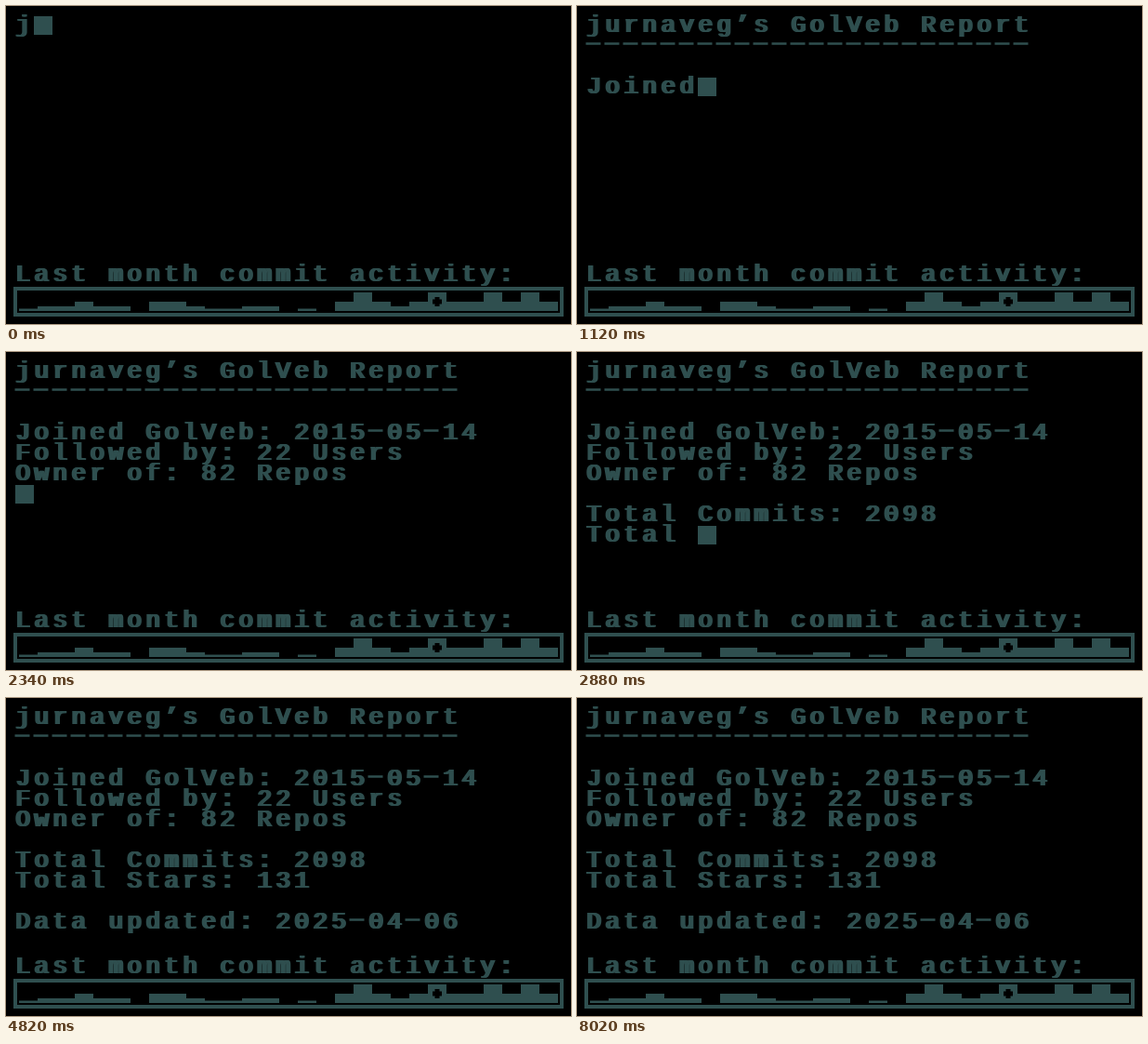
These frames come from a looping animation (608 px wide and 342 px high, 8420 ms). An HTML page with a canvas:

```html
<!DOCTYPE html>
<html lang="en">
<head>
<meta charset="utf-8">
<title>Terminal activity</title>
<style>
  html, body { margin: 0; width: 100%; height: 100%; overflow: hidden; background: #000; }
  canvas { display: block; width: 608px; height: 342px; }
</style>
</head>
<body>
<canvas id="stage" width="608" height="342"></canvas>
<script>
const ctx = document.getElementById('stage').getContext('2d');

const LOOP = 8420, STEP = 20, BLINK_START = 3620, BLINK = 400;
const CELL = 20, LINE = 22, LEFT = 10, TOP = 10;
const DOT = CELL / 8;
const INK = '#2f4f4f';

const script = [
  'jurnaveg’s GolVeb Report',
  '-'.repeat(24),
  '',
  'Joined GolVeb: 2015-05-14',
  'Followed by: 22 Users',
  'Owner of: 82 Repos',
  '',
  'Total Commits: 2098',
  'Total Stars: 131',
  '',
  'Data updated: 2025-04-06'
].join('\n');

// One digit per day, in eighths of a cell
const days = '12242204421122010484248448484';
const markedDay = 22;

function drawChar(ch, x, y) {
  if (ch === '-') {
    ctx.fillRect(x - 0.5, y + 7.25, 16, DOT);
    return;
  }
  // Repeated offsets give heavy stems and thin bars
  for (const dx of [-1, 0, 1, 2]) ctx.fillText(ch, x + dx, y + 18);
}

function drawLine(text, y) {
  [...text].forEach((ch, i) => drawChar(ch, LEFT + i * CELL, y));
}

function drawChart() {
  const x0 = 14, y0 = 308;
  ctx.lineWidth = 4;
  ctx.strokeRect(10, 304, 588, 28);
  [...days].forEach((level, i) => {
    const h = level * DOT;
    ctx.fillRect(x0 + i * CELL, y0 + CELL - h, CELL, h);
  });

  const x = x0 + markedDay * CELL;
  ctx.fillStyle = '#000';
  ctx.fillRect(x + 3 * DOT, y0 + 2 * DOT, 2 * DOT, 4 * DOT);
  ctx.fillRect(x + 2 * DOT, y0 + 3 * DOT, 4 * DOT, 2 * DOT);
  ctx.fillStyle = INK;
}

function cursorVisible(t) {
  return t < BLINK_START || Math.floor((t - BLINK_START) / BLINK) % 2 === 0;
}

function draw(t) {
  ctx.fillStyle = '#000';
  ctx.fillRect(0, 0, 608, 342);
  ctx.fillStyle = ctx.strokeStyle = INK;
  ctx.font = '26px "Liberation Mono", "DejaVu Sans Mono", monospace';
  ctx.textBaseline = 'alphabetic';

  const typed = script.slice(0, Math.floor(t / STEP) + 1).split('\n');
  typed.forEach((text, row) => drawLine(text, TOP + row * LINE));

  if (cursorVisible(t)) {
    const row = typed.length - 1;
    ctx.fillRect(LEFT + typed[row].length * CELL, TOP + row * LINE + 1, CELL, CELL);
  }

  drawLine('Last month commit activity:', 278);
  drawChart();
}

const start = performance.now();
function tick() {
  draw((performance.now() - start) % LOOP);
  requestAnimationFrame(tick);
}
tick();
</script>
</body>
</html>
```
